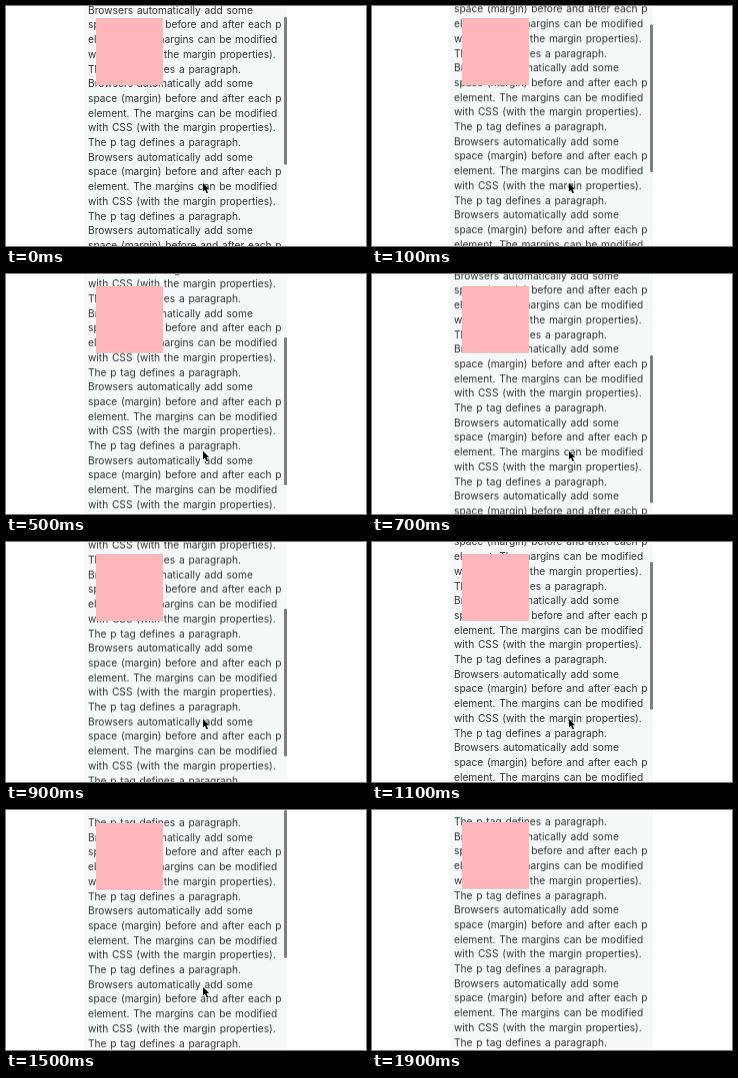
Animation of 360 by 240 pixels, one loop 2000 ms. Source, as an HTML page:

```html
<!DOCTYPE html>
<html lang="en">
<head>
<meta charset="utf-8">
<title>Sticky square</title>
<style>
  html, body { margin: 0; width: 100%; height: 100%; overflow: hidden; background: #fff; }
  #stage { position: relative; width: 360px; height: 240px; overflow: hidden; }
  #panel { position: absolute; left: 78px; top: 0; width: 203px; height: 240px; overflow: hidden; background: #f5f9f9; }
  #text {
    position: absolute; left: 3.7px; top: 4.4px;
    font: 10.2px/14.7px Inter, "Noto Sans", sans-serif;
    word-spacing: .9px; white-space: pre; color: #333;
    will-change: transform;
  }
  #square { position: absolute; left: 12px; top: 12px; width: 67px; height: 67px; background: #ffb6ba; }
  #thumb { position: absolute; right: 0; top: 0; width: 3.2px; height: 147.5px; border-radius: 1.6px; background: #7d7f7f; }
  #cursor { position: absolute; left: 196px; top: 176px; }
</style>
</head>
<body>
<div id="stage">
  <div id="panel">
    <div id="text"></div>
    <div id="square"></div>
    <div id="thumb"></div>
  </div>
  <svg id="cursor" width="9" height="13" viewBox="-1 -1 9 13">
    <path d="M0 0V8.6L2 6.8L3.5 10.3L5 9.7L3.5 6.3H6.2Z" fill="#000" stroke="#fff" stroke-width=".7" paint-order="stroke"/>
  </svg>
</div>
<script>
  const [text, square, thumb, cursor] =
    ['text', 'square', 'thumb', 'cursor'].map(id => document.getElementById(id));

  text.textContent = [
    'The p tag defines a paragraph.',
    'Browsers automatically add some',
    'space (margin) before and after each p',
    'element. The margins can be modified',
    'with CSS (with the margin properties).',
    ''
  ].join('\n').repeat(7);

  // Scroll offset per 100 ms step; negative values are the bounce at the top.
  const STEP = 100;
  const offsets = [22.3, 38, 57, 76.8, 104, 134, 158, 171.8, 163, 140.8,
                   95, 41.3, 10, -3.2, -2, -1, -0.4, 0, 0, 0];
  const HIDE_STEP = 17;

  const moveY = (el, y) => { el.style.transform = `translateY(${y}px)`; };

  function draw(now) {
    const step = Math.floor(now / STEP) % offsets.length;
    const scroll = offsets[step];
    const visibility = step < HIDE_STEP ? 'visible' : 'hidden';
    moveY(text, -scroll);
    moveY(square, Math.max(0, -scroll));
    moveY(thumb, Math.max(0, scroll * 0.47 + 0.3));
    thumb.style.visibility = cursor.style.visibility = visibility;
  }

  let start;
  function tick(now) {
    start ??= now;
    draw(now - start);
    requestAnimationFrame(tick);
  }
  draw(0);
  requestAnimationFrame(tick);
</script>
</body>
</html>
```
